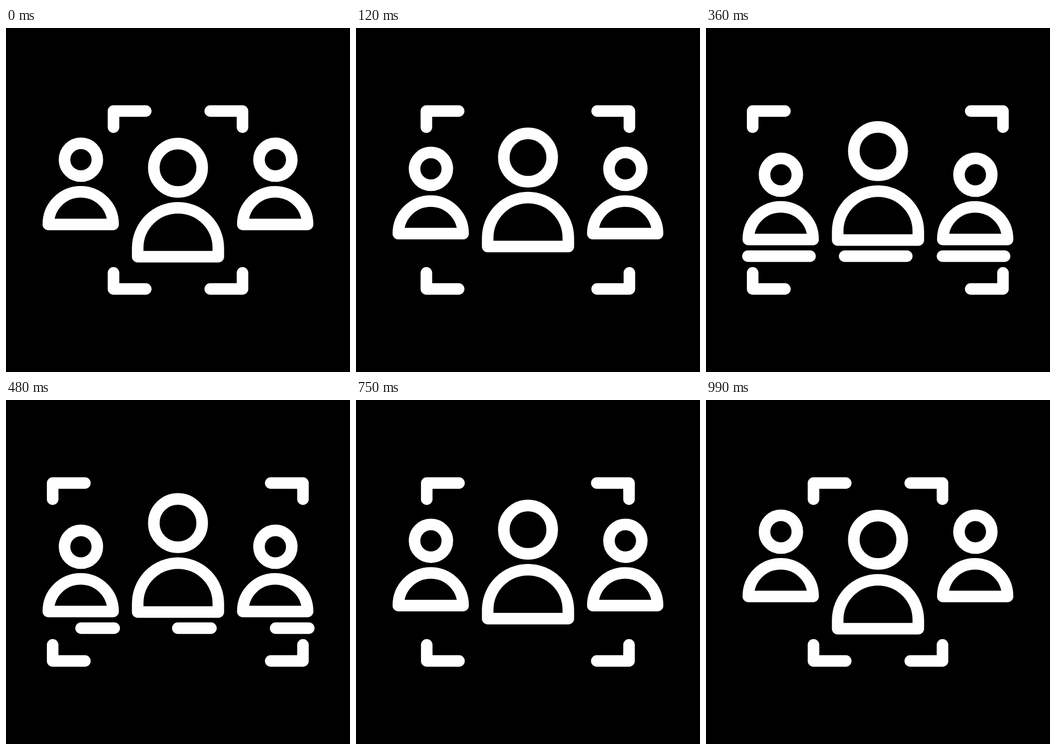
An HTML page that plays this animation: 640x640 px, repeating every 1020 ms.

```html
<!DOCTYPE html>
<html lang="en">
<head>
<meta charset="utf-8">
<title>Group focus</title>
<style>
  html, body { margin: 0; width: 100%; height: 100%; overflow: hidden; background: #000; }
  svg { display: block; width: 100%; height: 100%; }
  .ink { fill: none; stroke: #fff; stroke-width: 21.5; stroke-linecap: round; stroke-linejoin: round; }
</style>
</head>
<body>
<svg viewBox="0 0 640 640">
  <g class="ink">
    <g id="left"><path d="M200 184.5V154.5H260M200 455.5V485.5H260"/></g>
    <g id="right"><path d="M440 184.5V154.5H380M440 455.5V485.5H380"/></g>
    <g id="lead">
      <circle cx="320" cy="260" r="45"/>
      <path d="M245 425.5V409.5A75 75 0 0 1 395 409.5V425.5Z"/>
    </g>
    <g id="sides">
      <g id="member">
        <circle cx="139.4" cy="245" r="30.5"/>
        <path d="M78.8 365.5V365A60.2 60.2 0 0 1 199.2 365V365.5Z"/>
      </g>
      <use href="#member" x="361.8"/>
    </g>
    <path id="bars"/>
  </g>
</svg>
<script>
const LOOP = 1020, STEP = 30;
const BAR_X = [78, 258, 440], BAR_Y = 424.5, BAR_LEN = 123.3;
const $ = id => document.getElementById(id);

// Cubic easing with flat ends: control points (a, 0) and (b, 1).
function ease(a, b) {
  return x => {
    if (x <= 0) return 0;
    if (x >= 1) return 1;
    let lo = 0, hi = 1, t = 0.5;
    for (let i = 0; i < 30; i++) {
      t = (lo + hi) / 2;
      const s = 1 - t;
      if (3 * s * s * t * a + 3 * s * t * t * b + t * t * t < x) lo = t;
      else hi = t;
    }
    return t * t * (3 - 2 * t);
  };
}

const glide = ease(0.41, 0.56);
const trim = ease(0.42, 0.58);
const span = (t, from, to) => (t - from) / (to - from);
const shift = (id, x, y) => $(id).setAttribute("transform", `translate(${x.toFixed(2)} ${y.toFixed(2)})`);

function draw(t) {
  const spread = glide(span(t, 0, 217)) - glide(span(t, 570, 990));
  shift("left", -113.2 * spread, 0);
  shift("right", 112.5 * spread, 0);
  shift("lead", 0, -31 * spread);
  shift("sides", 0, 28 * spread);

  const head = trim(span(t, 220, 390)) * BAR_LEN;
  const tail = trim(span(t, 390, 570)) * BAR_LEN;
  const bars = head > tail
    ? BAR_X.map(x => `M${x + tail} ${BAR_Y}H${x + head}`).join("")
    : "";
  $("bars").setAttribute("d", bars);
}

const start = performance.now();
function tick() {
  const t = (performance.now() - start) % LOOP;
  draw(Math.floor(t / STEP) * STEP);
  requestAnimationFrame(tick);
}
tick();
</script>
</body>
</html>
```
